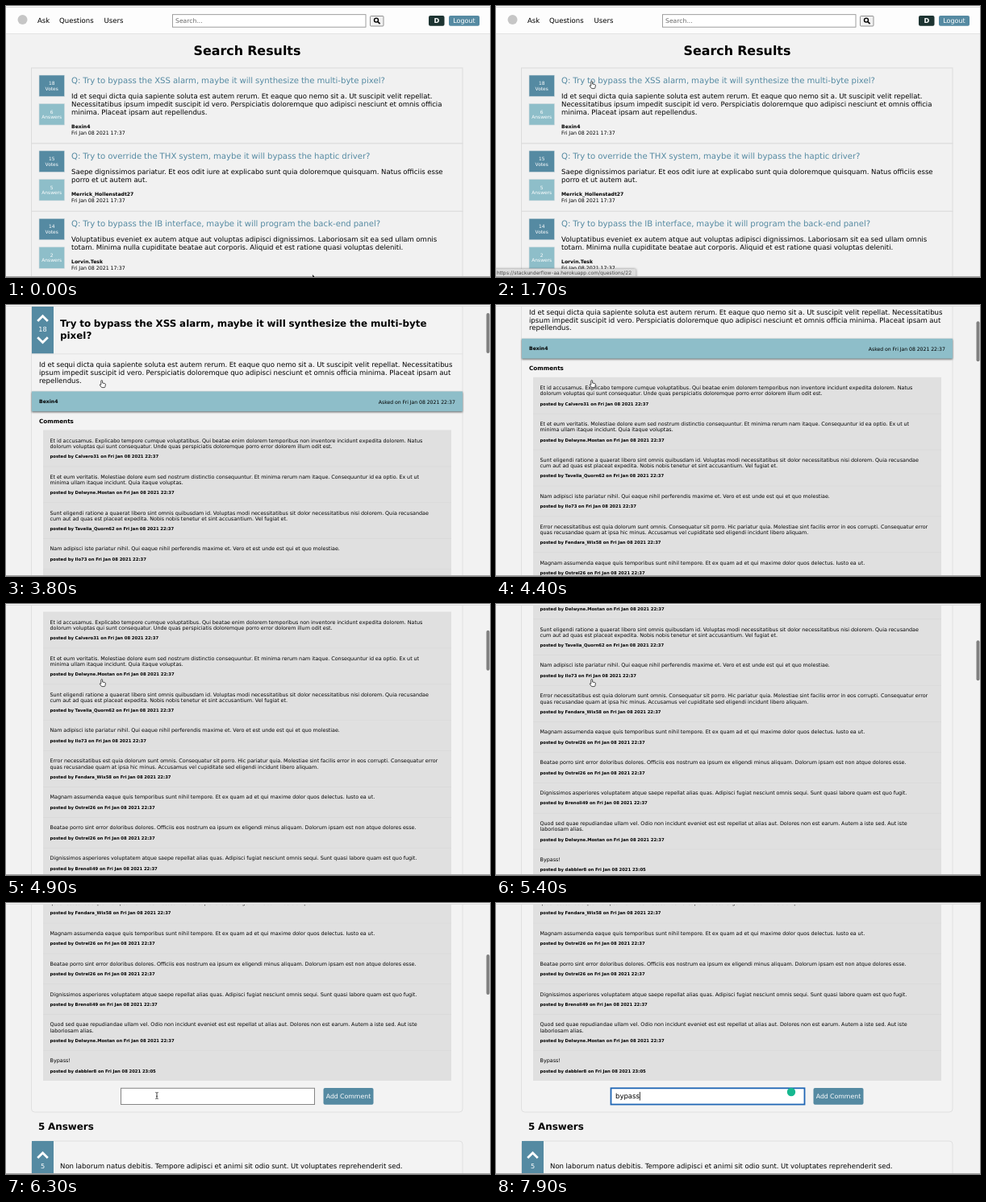
These frames come from a looping animation (600x337 px, 8000 ms). An HTML page:

```html
<!DOCTYPE html>
<html lang="en">
<head>
<meta charset="utf-8">
<title>Search and comment</title>
<style>
  html, body { margin: 0; width: 100%; height: 100%; overflow: hidden; background: #f2f2f2; }
  svg { display: block; width: 600px; height: 337px; }
  text {
    font-family: "DejaVu Sans", Inter, sans-serif;
    word-spacing: -.03em;
    text-rendering: geometricPrecision;
    white-space: pre;
  }
  .system { font-family: Inter, sans-serif; }
</style>
</head>
<body>
<svg id="stage" viewBox="0 0 600 337"></svg>
<script>
const LOOP = 8000, STEP = 100;
const BLUE = '#558aa2', TEAL = '#8ebec9', DARK = '#1d3432', EDGE = '#dcdcdc';
const stage = document.getElementById('stage');

function el(parent, tag, attrs = {}) {
  const node = document.createElementNS('http://www.w3.org/2000/svg', tag);
  for (const key in attrs) node.setAttribute(key, attrs[key]);
  return parent.appendChild(node);
}
const group = (parent, y = 0) => el(parent, 'g', { transform: `translate(0 ${y})` });

function box(parent, x, y, x2, y2, fill, more = {}) {
  return el(parent, 'rect', { x, y, width: x2 - x, height: y2 - y, fill, ...more });
}

// cy is the middle of the capitals
function label(parent, x, cy, text, size, more = {}) {
  const node = el(parent, 'text', { x, y: cy + size * .35, 'font-size': size, fill: '#000', ...more });
  node.textContent = text;
  return node;
}
const bold = { 'font-weight': 700 };
const middle = { 'text-anchor': 'middle' };
const whiteMid = { fill: '#fff', ...middle };

function header(parent) {
  box(parent, 0, 0, 600, 34.5, '#fdfdfd');
  box(parent, 0, 34, 600, 35, '#e3e3e3');
  el(parent, 'circle', { cx: 20.5, cy: 17, r: 6, fill: '#c6c6c6' });
  label(parent, 39, 18, 'Ask', 8.55);
  label(parent, 66, 18, 'Questions', 8.55);
  label(parent, 121.5, 18, 'Users', 8.55);
  box(parent, 206.5, 10.7, 446, 26.2, '#fff', { stroke: '#888', 'stroke-width': .8 });
  label(parent, 210, 18.4, 'Search...', 7.7, { fill: '#6a6a6a' });
  box(parent, 451.5, 12.5, 468, 25, '#f1f1f1', { stroke: '#777', 'stroke-width': .8, rx: 1 });
  el(parent, 'circle', { cx: 459, cy: 17.6, r: 2.5, fill: 'none', stroke: '#000', 'stroke-width': 1.4 });
  el(parent, 'path', { d: 'M461 19.6l2.6 2.6', stroke: '#000', 'stroke-width': 1.7 });
  box(parent, 524, 12, 543.5, 24.8, DARK, { rx: 2 });
  label(parent, 533.8, 18.4, 'D', 8.2, { ...bold, ...whiteMid });
  box(parent, 549, 12, 587, 24.8, BLUE, { rx: 2 });
  label(parent, 568, 18.4, 'Logout', 8, whiteMid);
}

// ---- search results ----
const results = [
  [77, 18, 6, 'Q: Try to bypass the XSS alarm, maybe it will synthesize the multi-byte pixel?', [
    'Id et sequi dicta quia sapiente soluta est autem rerum. Et eaque quo nemo sit a. Ut suscipit velit repellat.',
    'Necessitatibus ipsum impedit suscipit id vero. Perspiciatis doloremque quo adipisci nesciunt et omnis officia',
    'minima. Placeat ipsam aut repellendus.'], 'Bexin4'],
  [171, 15, 5, 'Q: Try to override the THX system, maybe it will bypass the haptic driver?', [
    'Saepe dignissimos pariatur. Et eos odit iure at explicabo sunt quia doloremque quisquam. Natus officiis esse',
    'porro et ut autem aut.'], 'Merrick_Hollenstadt27'],
  [255.3, 14, 2, 'Q: Try to bypass the IB interface, maybe it will program the back-end panel?', [
    'Voluptatibus eveniet ex autem atque aut voluptas adipisci dignissimos. Laboriosam sit ea sed ullam omnis',
    'totam. Minima nulla cupiditate beatae aut corporis. Aliquid et est ratione quasi voluptas deleniti.'],
    'Lorvin.Tesk']
];

function badge(parent, y, count, word, fill) {
  box(parent, 41, y, 72.5, y + 26.5, fill, { stroke: '#d4dcdf', 'stroke-width': .6 });
  label(parent, 56.7, y + 10, count, 5.9, whiteMid);
  label(parent, 56.7, y + 16.6, word, 5.9, whiteMid);
}

const searchPage = group(stage);
box(searchPage, 0, 0, 600, 337, '#f2f2f2');
header(searchPage);
label(searchPage, 299, 55.5, 'Search Results', 15.9, { ...bold, ...middle });
results.forEach(([top, votes, answers, title, lines, user], i) => {
  const bottom = i < 2 ? results[i + 1][0] : 345;
  box(searchPage, 31.5, top, 566, bottom, '#f1f1f1', { stroke: EDGE });
  badge(searchPage, top + 9, votes, 'Votes', BLUE);
  badge(searchPage, top + 44.5, answers, 'Answers', TEAL);
  label(searchPage, 81, top + 15, title, 10.15, { fill: BLUE });
  lines.forEach((line, n) => label(searchPage, 81, top + 35 + n * 9.9, line, 8.55));
  const nameY = top + 35 + (lines.length - 1) * 9.9 + 17.6;
  label(searchPage, 81, nameY, user, 6.1, bold);
  label(searchPage, 81, nameY + 8.2, 'Fri Jan 08 2021 17:37', 6.3);
});

// ---- question ----
const comments = [
  ['Calvero31', 'Et id accusamus. Explicabo tempore cumque voluptatibus. Qui beatae enim dolorem temporibus non inventore incidunt expedita dolorem. Natus',
    'dolorum voluptas qui sunt consequatur. Unde quas perspiciatis doloremque porro error dolorem illum odit est.'],
  ['Delwyne.Mostan', 'Et et eum veritatis. Molestiae dolore eum sed nostrum distinctio consequuntur. Et minima rerum nam itaque. Consequuntur id ea optio. Ex ut ut',
    'minima ullam itaque incidunt. Quia itaque voluptas.'],
  ['Tavelia_Quorn62', 'Sunt eligendi ratione a quaerat libero sint omnis quibusdam id. Voluptas modi necessitatibus sit dolor necessitatibus nisi dolorem. Quia recusandae',
    'cum aut ad quas est placeat expedita. Nobis nobis tenetur et sint accusantium. Vel fugiat et.'],
  ['Ilo73', 'Nam adipisci iste pariatur nihil. Qui eaque nihil perferendis maxime et. Vero et est unde est qui et quo molestiae.'],
  ['Fendara_Wix58', 'Error necessitatibus est quia dolorum sunt omnis. Consequatur sit porro. Hic pariatur quia. Molestiae sint facilis error in eos corrupti. Consequatur error',
    'quas recusandae quam at ipsa hic minus. Accusamus vel cupiditate sed eligendi incidunt libero aliquam.'],
  ['Ostrel26', 'Magnam assumenda eaque quis temporibus sunt nihil tempore. Et ex quam ad et qui maxime dolor quos delectus. Iusto ea ut.'],
  ['Ostrel26', 'Beatae porro sint error doloribus dolores. Officiis eos nostrum ea ipsum ex eligendi minus aliquam. Dolorum ipsam est non atque dolores esse.'],
  ['Brenoli49', 'Dignissimos asperiores voluptatem atque saepe repellat alias quas. Adipisci fugiat nesciunt omnis sequi. Sunt quasi labore quam est quo fugit.'],
  ['Delwyne.Mostan', 'Quod sed quae repudiandae ullam vel. Odio non incidunt eveniet est est repellat ut alias aut. Dolores non est earum. Autem a iste sed. Aut iste',
    'laboriosam alias.'],
  ['dabbler8', 'Bypass!']
];

function voteBox(parent, y, count) {
  box(parent, 32, y, 59, y + 61.5, BLUE);
  el(parent, 'path', {
    d: `M39.2 ${y + 21}l6.3 -6.3l6.3 6.3M39.2 ${y + 41.2}l6.3 6.3l6.3 -6.3`,
    fill: 'none', stroke: '#fff', 'stroke-width': 2.8
  });
  label(parent, 45.5, y + 31, count, 8.2, whiteMid);
}

const questionPage = group(stage);
box(questionPage, 0, 0, 600, 900, '#f2f2f2');
header(questionPage);
const body = group(questionPage, 48);
const card = { stroke: '#e0e0e0', rx: 4 };
box(body, 31.5, -1, 566, 608.5, '#f3f3f3', card);
voteBox(body, -1, 18);
label(body, 67, 23.3, 'Try to bypass the XSS alarm, maybe it will synthesize the multi-byte', 11.9, bold);
label(body, 67, 37.8, 'pixel?', 11.9, bold);
box(body, 32, 60.5, 566, 61.3, '#dedede');
[
  'Id et sequi dicta quia sapiente soluta est autem rerum. Et eaque quo nemo sit a. Ut suscipit velit repellat. Necessitatibus',
  'ipsum impedit suscipit id vero. Perspiciatis doloremque quo adipisci nesciunt et omnis officia minima. Placeat ipsam aut',
  'repellendus.'
].forEach((line, n) => label(body, 41, 74.5 + n * 9.75, line, 8.55));
box(body, 32, 107.5, 566, 132.3, TEAL, { style: 'filter:drop-shadow(0 1.4px 1px #0009)' });
label(body, 41, 119.6, 'Bexin4', 6.1, bold);
label(body, 557, 120.6, 'Asked on Fri Jan 08 2021 22:37', 6.2, { 'text-anchor': 'end' });
label(body, 41, 144.2, 'Comments', 7.2, bold);

box(body, 46, 155.5, 552, 569.5, '#e0e0e0');
let rowY = 168.5;
comments.forEach(([user, ...lines], i) => {
  if (i) box(body, 46, rowY - 12.8, 552, rowY - 12.2, '#d8d8d8');
  lines.forEach((line, n) => label(body, 54.5, rowY + n * 7.2, line, 6.4));
  const time = i === comments.length - 1 ? '23:05' : '22:37';
  label(body, 54.5, rowY + lines.length * 7.2 + 5.6, `posted by ${user} on Fri Jan 08 2021 ${time}`, 5.3, bold);
  rowY += lines.length > 1 ? 44.9 : 37.9;
});

const field = box(body, 142.5, 578.8, 382.5, 599, '#fff');
const typed = label(body, 148, 588.8, '', 8.5);
const caret = box(body, 0, 583.4, .8, 594, '#000');
const helper = el(body, 'circle', { cx: 366, cy: 583.5, r: 5.2, fill: '#17b890' });
box(body, 393.5, 578.5, 455.5, 599.3, BLUE, { rx: 2 });
label(body, 424.5, 589, 'Add Comment', 7.8, whiteMid);
label(body, 40, 626.8, '5 Answers', 11.9, bold);
box(body, 31.5, 644.5, 566, 780, '#f3f3f3', card);
voteBox(body, 644.5, 5);
label(body, 67, 675.8, 'Non laborum natus debitis. Tempore adipisci et animi sit odio sunt. Ut voluptates reprehenderit sed.', 8.55);

// ---- browser window ----
const thumb = box(stage, 595.5, 0, 599.5, 50, '#808080', { rx: 2 });
const status = group(stage);
box(status, -2, 327, 173.5, 340, '#dcdcdc', { rx: 1.5, style: 'filter:drop-shadow(0 0 1.5px #0007)' });
label(status, 1, 331.8, 'https://stackunderflow-aa.herokuapp.com/questions/22', 6.3, { fill: '#444', class: 'system' });
box(stage, 0, 0, 600, 1, '#fafafa');
box(stage, 0, 1, 600, 2, '#dcdcdc');
box(stage, 0, 336, 600, 337, '#a2a2a2');

const cursor = group(stage);
const shapes = {
  arrow: el(cursor, 'path', {
    d: 'M0 0V7.6L1.8 6L3 8.7L4.2 8.2L3 5.6H5.4Z', fill: '#000', stroke: '#fff', 'stroke-width': .6
  }),
  hand: el(cursor, 'path', {
    d: 'M0 0Q.9 0 .9 1V3.4L3.8 4Q4.8 4.3 4.7 5.3L4.2 8Q4 9 3.2 9H.4Q-.3 9 -.7 8.4L-2.6 5.6Q-2 4.7 -.9 5.6V1Q-.9 0 0 0Z',
    fill: '#fff', stroke: '#222', 'stroke-width': .8, 'stroke-linejoin': 'round'
  }),
  beam: el(cursor, 'path', {
    d: 'M-1.7 -4Q0 -4 0 -3V3Q0 4 -1.7 4M1.7 -4Q0 -4 0 -3M0 3Q0 4 1.7 4M-1 .8H1',
    fill: 'none', stroke: '#222', 'stroke-width': .8
  })
};

// ---- motion: [time, value...] ----
const pointer = [[0, 379.8, 333.5], [300, 340, 280], [700, 230, 175], [1100, 150, 112], [1500, 118.7, 93.6],
  [5900, 118.7, 93.6], [6200, 187, 239.5]];
const scrolling = [[3500, 0], [3800, 48], [4400, 113.7], [5000, 210], [5400, 275], [6000, 396.5]];
const keys = [7200, 7300, 7450, 7550, 7700, 7850];
const OPEN = 2800, FOCUS = 6600;

function at(track, t) {
  if (t <= track[0][0]) return track[0].slice(1);
  for (let i = 1; i < track.length; i++) {
    const a = track[i - 1], b = track[i];
    if (t <= b[0]) {
      const k = (t - a[0]) / (b[0] - a[0]);
      return a.slice(1).map((v, n) => v + (b[n + 1] - v) * k);
    }
  }
  return track.at(-1).slice(1);
}
const show = (node, on) => node.setAttribute('visibility', on ? 'visible' : 'hidden');
const place = (node, x, y) => node.setAttribute('transform', `translate(${x} ${y})`);

function draw(t) {
  const [scroll] = at(scrolling, t);
  const asked = t >= OPEN, focused = t >= FOCUS;
  show(searchPage, !asked);
  questionPage.style.display = asked ? '' : 'none';
  place(questionPage, 0, -scroll);
  show(status, t >= 1400 && !asked);

  thumb.setAttribute('y', 2.6 + scroll * .155);
  thumb.setAttribute('opacity', t < 3500 ? 0 : at([[6400, 1], [6700, 0]], t)[0]);

  field.setAttribute('stroke', focused ? '#1f66b5' : '#858585');
  field.setAttribute('stroke-width', focused ? 1.8 : 1);
  show(helper, focused);
  typed.textContent = 'bypass'.slice(0, keys.filter(k => t >= k).length);
  caret.setAttribute('x', 148 + (typed.textContent ? typed.getComputedTextLength() : 0));
  show(caret, focused && (t >= keys[0] || t < FOCUS + 500));

  place(cursor, ...at(pointer, t));
  const shape = t >= keys[0] ? '' : t >= 6200 ? 'beam' : t >= 1400 ? 'hand' : 'arrow';
  for (const name in shapes) show(shapes[name], name === shape);
}

const start = performance.now();
function tick() {
  const t = (performance.now() - start) % LOOP;
  draw(Math.floor(t / STEP) * STEP);
  requestAnimationFrame(tick);
}
tick();
</script>
</body>
</html>
```
